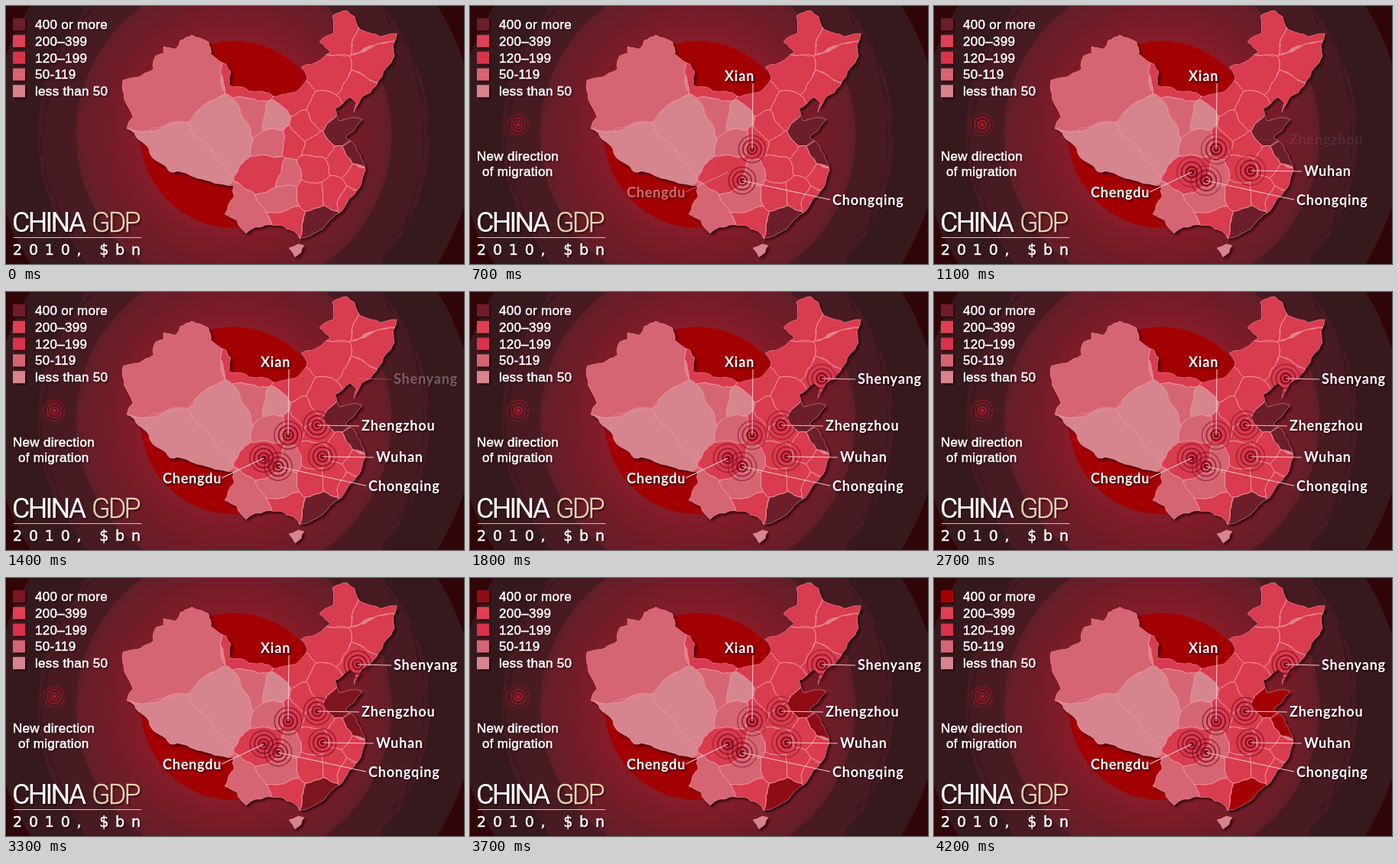
An HTML page with a canvas for the animation above (4300 ms loop, 599x337 px).

```html
<!DOCTYPE html>
<html lang="en">
<head>
<meta charset="utf-8">
<title>China GDP</title>
<style>
html, body { margin: 0; width: 100%; height: 100%; overflow: hidden; background: #36191d; }
canvas { display: block; width: 599px; height: 337px; }
</style>
</head>
<body>
<canvas id="stage" width="599" height="337"></canvas>
<script>
const LOOP = 4300, STEP = 100, W = 599, H = 337;
const ctx = document.getElementById('stage').getContext('2d');
const RICH = '#d93b4f', MID = '#d56573', PALE = '#d6858f', TOP = 'top';

const clamp = x => Math.max(0, Math.min(1, x));
const hash = n => { const s = Math.sin(n) * 4375.85; return s - Math.floor(s); };
const parse = text => text.split(' ').map(p => p.split(',').map(Number));

// Midpoint displacement; gives the same bend in both directions.
function bend(a, b) {
  const dx = b[0] - a[0], dy = b[1] - a[1];
  if (Math.hypot(dx, dy) < 8) return [b];
  const sign = dx > 0 || (dx === 0 && dy > 0) ? 1 : -1;
  const d = sign * (hash(a[0] + b[0] + 1.7 * (a[1] + b[1])) - 0.5) * 0.22;
  const mid = [(a[0] + b[0]) / 2 - dy * d, (a[1] + b[1]) / 2 + dx * d];
  return [...bend(a, mid), ...bend(mid, b)];
}

function rough(points) {
  const path = new Path2D();
  path.moveTo(...points[0]);
  points.forEach((p, i) =>
    bend(p, points[(i + 1) % points.length]).forEach(q => path.lineTo(...q)));
  path.closePath();
  return path;
}

const mainland = rough(parse('153,97 183,87 193,82 196,65 206,62 206,53 222,56 228,45 243,38 265,47 268,63 288,76 294,86 292,104 318,111 350,118 384,108 394,92 386,80 412,70 424,60 410,47 428,36 427,13 446,6 456,14 464,31 490,40 511,36 508,66 498,80 484,104 455,139 458,126 450,119 430,134 436,150 466,148 444,172 458,184 470,215 462,238 438,269 384,304 376,294 340,286 314,297 302,280 286,272 298,250 297,234 250,225 215,217 190,196 168,166 158,160 166,145'));
const island = rough(parse('370,316 382,311 390,313 386,322 378,328'));

// Province centres "x,y" or "x,y,reach", grouped by colour.
const sites = Object.entries({
  [PALE]: '232,212,39 288,165,22 351,150',
  [MID]: '242,106 326,146 352,175 364,222 364,250 312,282',
  [RICH]: '330,100 375,122 425,86 436,36 478,48 478,80 462,108 414,142 391,158 372,176 352,218 408,184 404,212 436,204 400,245 428,243 454,252 460,222 370,280',
  [TOP]: '436,162 460,190 412,282'
}).flatMap(([color, text]) => parse(text).map(([x, y, reach = 0]) => ({ x, y, reach, color })));

// Part of the stage that is nearer to this site than to any other.
function cell(s) {
  const power = p => p.x * p.x + p.y * p.y - p.reach * p.reach;
  let poly = [[0, 0], [W, 0], [W, H], [0, H]];
  for (const o of sites) {
    if (o === s) continue;
    const side = p => 2 * (o.x - s.x) * p[0] + 2 * (o.y - s.y) * p[1] - power(o) + power(s);
    poly = poly.flatMap((p, i) => {
      const q = poly[(i + 1) % poly.length], a = side(p), b = side(q), f = a / (a - b);
      const kept = a <= 0 ? [p] : [];
      if (a * b < 0) kept.push([p[0] + (q[0] - p[0]) * f, p[1] + (q[1] - p[1]) * f]);
      return kept;
    });
  }
  return rough(poly);
}
const provinces = sites.map(s => ({ color: s.color, path: cell(s) }));

// Marker, end of the leader line, start of the label.
const cities = [
  ['Xian', '369,187 370,101 333,98'],
  ['Chongqing', '356,228 471,253 474,260'],
  ['Chengdu', '337,217 282,243 205,250'],
  ['Wuhan', '414,215 481,216 484,222'],
  ['Zhengzhou', '407,174 462,175 465,181'],
  ['Shenyang', '460,113 504,114 507,120']
].map(([name, points], i) => {
  const [at, end, text] = parse(points);
  return { name, at, end, text, start: 100 + i * 245 };
});

function shadow(size) {
  ctx.shadowColor = size ? 'rgba(30,0,8,.85)' : 'transparent';
  ctx.shadowBlur = size + 1;
  ctx.shadowOffsetX = ctx.shadowOffsetY = size;
}

function write(text, x, y, font, spacing, color = '#fff', outline = 0) {
  ctx.font = font;
  ctx.letterSpacing = spacing + 'px';
  ctx.fillStyle = ctx.strokeStyle = color;
  ctx.lineWidth = outline;
  shadow(1.5);
  ctx.fillText(text, x, y);
  shadow(0);
  if (outline) ctx.strokeText(text, x, y);
}

const legendText = (text, x, y) =>
  write(text, x, y, '17px "Liberation Sans", Arial, sans-serif', 0.3, '#fff', 0.5);

function line(a, b, color, width) {
  ctx.strokeStyle = color;
  ctx.lineWidth = width;
  ctx.beginPath();
  ctx.moveTo(...a);
  ctx.lineTo(...b);
  ctx.stroke();
}

function circle(x, y, r, fill) {
  ctx.beginPath();
  ctx.arc(x, y, r, 0, Math.PI * 2);
  if (fill) {
    ctx.fillStyle = fill;
    ctx.fill();
  } else ctx.stroke();
}

function drawBackground() {
  const [x, y] = [298, 168];
  ctx.fillStyle = '#300508';
  ctx.fillRect(0, 0, W, H);
  circle(x, y, 315, '#36191d');
  circle(x, y, 256, '#481b22');
  ctx.strokeStyle = '#36191d';
  ctx.lineWidth = 1.5;
  for (let i = 0; i < 60; i++) {
    const from = (i % 2) * Math.PI + (hash(i) - 0.5) * 1.4;
    ctx.beginPath();
    ctx.arc(x, y, 247 + hash(i + 200) * 9, from, from + 0.03 + hash(i + 400) * 0.1);
    ctx.stroke();
  }
  const glow = ctx.createRadialGradient(x, y, 120, x, y, 206);
  glow.addColorStop(0, '#871b29');
  glow.addColorStop(1, '#621e28');
  circle(x, y, 206, glow);
  circle(x, y, 122, '#a30003');
}

function drawMap(topColor) {
  shadow(2.5);
  ctx.fillStyle = PALE;
  ctx.fill(mainland);
  ctx.fill(island);
  shadow(0);
  ctx.strokeStyle = '#ee8f96';
  ctx.lineWidth = 0.8;
  ctx.save();
  ctx.clip(mainland);
  for (const { color, path } of provinces) {
    ctx.fillStyle = color === TOP ? topColor : color;
    ctx.fill(path);
  }
  provinces.forEach(p => ctx.stroke(p.path));
  ctx.restore();
  ctx.lineWidth = 0.5;
  ctx.stroke(mainland);
  ctx.stroke(island);
}

function drawMarker([x, y], t, alpha, color, size) {
  const turn = t / 900 * Math.PI * 2;
  const scale = size * (1 + 0.05 * Math.sin(turn));
  ctx.globalAlpha = alpha;
  circle(x, y, 3.3 * scale, color);
  ctx.strokeStyle = color;
  for (let k = 1; k <= 3; k++) {
    ctx.globalAlpha = alpha * (1.05 - k * 0.15 + 0.1 * Math.cos(turn - k * 1.5));
    ctx.lineWidth = (2.9 - k * 0.5) * size;
    circle(x, y, (0.8 + 5.9 * k) * scale);
  }
  ctx.globalAlpha = 1;
}

function drawLegend(topColor, t) {
  const rows = [['400 or more', topColor], ['200–399', '#df4055'], ['120–199', '#d9324a'],
    ['50-119', MID], ['less than 50', PALE]];
  rows.forEach(([text, color], i) => {
    const y = 16 + i * 21.8;
    shadow(1.5);
    ctx.fillStyle = color;
    ctx.fillRect(9, y, 16, 16);
    legendText(text, 38, y + 14);
  });
  const alpha = clamp((t - 50) / 300);
  drawMarker([63, 155], t, alpha, '#b81426', 0.75);
  ctx.globalAlpha = alpha;
  legendText('New direction', 9, 202);
  legendText('of migration', 16, 222);
  ctx.globalAlpha = 1;
}

function drawTitle() {
  write('CHINA', 8, 295, '400 36px Roboto, sans-serif', -2.8);
  write('GDP', 112, 295, '300 36px Roboto, sans-serif', -2.8, '#ead9b0', 0.3);
  line([10, 302.5], [177, 302.5], '#e3bcbc', 1);
  write('2010, $bn', 9, 325, '19px "DejaVu Sans", sans-serif', 8.8, '#fff', 0.5);
}

function draw(t) {
  const k = clamp((t - 2900) / 1300);
  const mix = (a, b) => Math.round(a + (b - a) * k);
  const topColor = `rgb(${mix(108, 164)},${mix(30, 0)},${mix(42, 4)})`;
  drawBackground();
  drawMap(topColor);
  for (const c of cities) drawMarker(c.at, t, clamp((t - c.start - 100) / 150), '#7d0a1d', 1);
  for (const c of cities) {
    ctx.globalAlpha = clamp((t - c.start) / 250);
    line(c.at, c.end, '#efc3c6', 1.1);
    write(c.name, ...c.text, '700 18px Lato, sans-serif', 0.8);
  }
  ctx.globalAlpha = 1;
  drawLegend(topColor, t);
  drawTitle();
}

let last = -1;
function tick() {
  const t = Math.floor(performance.now() % LOOP / STEP) * STEP;
  if (t !== last) draw(last = t);
  requestAnimationFrame(tick);
}
tick();
</script>
</body>
</html>
```
